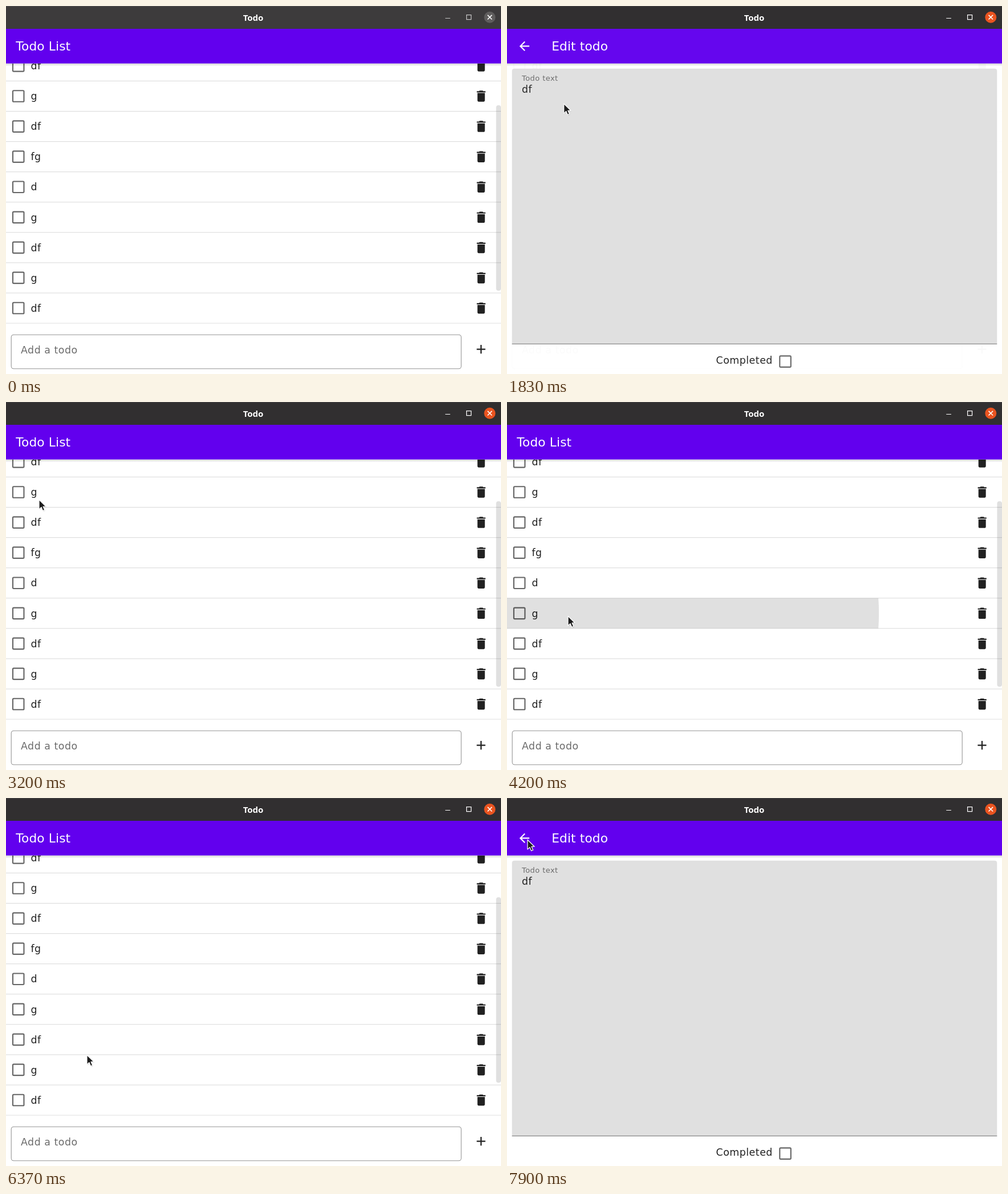
Write an HTML page that moves like this. It is 868x645 px and loops after 8 s.

```html
<!DOCTYPE html>
<html lang="en">
<head>
<meta charset="utf-8">
<title>Todo</title>
<style>
  html, body { margin: 0; width: 100%; height: 100%; overflow: hidden; background: #fff; }
  svg { display: block; width: 100vw; height: 100vh; }
  text { font-family: "DejaVu Sans", sans-serif; fill: #212121; white-space: pre; }
  .title { font: bold 15px "Open Sans", sans-serif; fill: #fff; text-anchor: middle; }
  .heading { font-size: 21.67px; letter-spacing: .16px; fill: #fff; }
  .body { font-size: 17.33px; letter-spacing: .54px; }
  .label { font-size: 13px; letter-spacing: .43px; }
  .muted { fill: #6b6b6b; }
  .box { fill: none; stroke: #666; stroke-width: 2.17; }
  .icon { fill: #212121; }
</style>
</head>
<body>
<svg viewBox="0 0 868 645" preserveAspectRatio="none">
  <defs>
    <linearGradient id="shade" x2="0" y2="1">
      <stop stop-opacity=".16"/>
      <stop offset="1" stop-opacity="0"/>
    </linearGradient>
    <clipPath id="listClip"><rect y="100.7" width="868" height="456"/></clipPath>
    <clipPath id="rowClip"><rect id="rowRect" width="868" height="53"/></clipPath>
    <rect id="check" class="box" x="-9.75" y="-9.75" width="19.5" height="19.5" rx="1.6"/>
    <path id="trash" transform="scale(1.0833) translate(-12 -12)"
      d="M6 19c0 1.1.9 2 2 2h8c1.1 0 2-.9 2-2V7H6zM19 4h-3.5l-1-1h-5l-1 1H5v2h14z"/>
    <g id="bar">
      <rect y="100.7" width="868" height="5" fill="url(#shade)"/>
      <rect y="40" width="868" height="60.7" fill="#6200ee"/>
    </g>
  </defs>
  <rect width="868" height="645" fill="#fff"/>

  <g id="listScreen">
    <g clip-path="url(#listClip)">
      <g id="rows"></g>
      <g clip-path="url(#rowClip)"><circle id="rowRipple"/></g>
    </g>
    <rect x="859.4" y="174" width="8.6" height="325" rx="4" fill="#000" fill-opacity=".12"/>
    <use href="#bar"/>
    <text class="heading" x="17.3" y="78">Todo List</text>
    <rect x="9.2" y="576.2" width="789" height="59.6" rx="4.3" fill="none" stroke="#959595" stroke-width="1.1"/>
    <text class="body muted" x="26" y="609">Add a todo</text>
    <path class="icon" transform="translate(833 601.7) scale(1.0833) translate(-12 -12)"
      d="M19 13h-6v6h-2v-6H5v-2h6V5h2v6h6z"/>
  </g>

  <g id="editScreen">
    <use href="#bar"/>
    <path transform="translate(30.5 70.4) scale(1.0833) translate(-12 -12)" fill="#fff"
      d="M20 11H7.83l5.59-5.59L12 4l-8 8 8 8 1.41-1.41L7.83 13H20z"/>
    <circle id="backRipple" cx="30.5" cy="70.4" fill="#fff"/>
    <text class="heading" x="78.2" y="78">Edit todo</text>
    <path fill="#e0e0e0" d="M8.7 592.5V114q0-4.3 4.3-4.3H855q4.3 0 4.3 4.3V592.5z"/>
    <rect x="8.7" y="591.8" width="850.6" height="1.1" fill="#7d7d7d"/>
    <text class="label muted" x="26" y="131">Todo text</text>
    <text class="body" id="editText" x="26" y="152"></text>
    <text class="body" x="366.5" y="626.5">Completed</text>
    <use href="#check" x="488" y="623.2"/>
  </g>

  <rect id="titleBar" width="868" height="40"/>
  <rect width="868" height="1" fill="#fff" fill-opacity=".09"/>
  <text class="title" x="433.5" y="25.7">Todo</text>
  <g id="controls" fill="none" stroke="#fff" stroke-width="1.2">
    <path d="M770.3 21.5h8.6M807.6 15.6h8v8h-8z"/>
  </g>
  <circle id="close" cx="848.3" cy="19.7" r="10"/>
  <path d="M844.5 15.9l7.6 7.6m0-7.6l-7.6 7.6" stroke="#fff" stroke-width="1.5"/>

  <g id="cursor">
    <path d="M2 2.5V19L6 15.6L8.7 22L11.8 20.7L9.2 14.5H14.4z" fill="#000" fill-opacity=".15"/>
    <path d="M1 1.3V18L5 14.4L7.6 20.6L10.7 19.3L8.1 13.2H13.2z"
      fill="#1c1c1c" stroke="#fff" stroke-width="1.2" stroke-linejoin="round"/>
  </g>
</svg>
<script>
const LOOP = 8000, FADE = 300, FOCUS_AT = 1500;
const ROW_STEP = 53.08, FIRST_CENTER = 104.9;
const items = ['df', 'g', 'df', 'fg', 'd', 'g', 'df', 'g', 'df'];

// Each visit: row pressed, edit screen opened, back pressed, list restored.
const visits = [
  { press: 1448, x: 122, row: 2, open: 1590, back: 2780, close: 2890 },
  { press: 4097, x: 106, row: 5, open: 4237, back: 5280, close: 5390 },
  { press: 6990, x: 115, row: 8, open: 7190, back: Infinity, close: Infinity },
];

// time, x, y of the pointer tip
const path = [
  [30, 72, 30], [530, 122, 203], [670, 122, 203], [830, 122, 207],
  [1620, 122, 207], [2300, 47, 88], [2570, 23, 73],
  [2930, 23, 73], [3600, 107, 313], [3870, 106, 374],
  [4270, 106, 374], [4930, 34, 94], [5070, 34, 79],
  [5430, 34, 79], [6100, 149, 222], [6200, 143, 438], [6370, 141, 449],
  [6860, 115, 525], [7230, 115, 525], [7570, 67, 148],
  [7770, 67, 148], [7900, 35, 72],
];

const $ = id => document.getElementById(id);
const clamp = v => Math.max(0, Math.min(1, v));
const lerp = (a, b, p) => a + (b - a) * p;
const set = (id, attrs) => {
  for (const name in attrs) $(id).setAttribute(name, attrs[name]);
};

// cubic-bezier(.4, 0, .2, 1)
function ease(x) {
  if (x <= 0 || x >= 1) return clamp(x);
  let low = 0, high = 1, s = .5;
  for (let i = 0; i < 20; i++) {
    s = (low + high) / 2;
    const bx = 3 * (1 - s) ** 2 * s * .4 + 3 * (1 - s) * s * s * .2 + s ** 3;
    if (bx < x) low = s; else high = s;
  }
  return 3 * (1 - s) * s * s + s ** 3;
}

const rippleAlpha = (age, hold) =>
  age < 0 ? 0 : clamp(age / 75) * (1 - clamp((age - Math.max(225, hold)) / 150));

$('rows').innerHTML = items.map((label, i) => {
  const y = FIRST_CENTER + i * ROW_STEP;
  return `<use href="#check" x="21.7" y="${y}"/>
    <text class="body" x="43.4" y="${y + 6.2}">${label}</text>
    <g class="icon" transform="translate(833.2 ${y})"><use href="#trash"/></g>
    <rect y="${y + 26}" width="868" height="1.08" fill-opacity=".14"/>`;
}).join('');

function pointerAt(t) {
  const next = path.findIndex(point => point[0] > t);
  if (next < 0) return path[path.length - 1].slice(1);
  if (next === 0) return path[0].slice(1);
  const [t0, x0, y0] = path[next - 1], [t1, x1, y1] = path[next];
  const p = (t - t0) / (t1 - t0);
  return [lerp(x0, x1, p), lerp(y0, y1, p)];
}

function drawRipples(t, visit) {
  const age = t - visit.press, p = clamp(age / 225);
  const shown = t >= FOCUS_AT ? .12 * rippleAlpha(age, visit.open - visit.press) : 0;
  const center = FIRST_CENTER + visit.row * ROW_STEP;
  set('rowRect', { y: center - 26.5 });
  set('rowRipple', {
    cx: lerp(visit.x, 434, p), cy: center,
    r: lerp(260, 446, ease(p)), 'fill-opacity': shown,
  });
  const backAge = t - visit.back;
  set('backRipple', {
    r: lerp(15.6, 26, ease(clamp(backAge / 225))),
    'fill-opacity': .24 * rippleAlpha(backAge, visit.close - visit.back),
  });
}

function draw(t) {
  const visit = visits.filter(v => t >= v.press).pop() || visits[0];
  const shown = ease((t - visit.open) / FADE) - ease((t - visit.close) / FADE);
  set('listScreen', { opacity: 1 - shown });
  set('editScreen', { opacity: shown });
  $('editText').textContent = items[visit.row];
  drawRipples(t, visit);

  const focused = t >= FOCUS_AT;
  set('titleBar', { fill: focused ? '#312f30' : '#3d3b3c' });
  set('controls', { 'stroke-opacity': focused ? 1 : .7 });
  set('close', { fill: focused ? '#e95420' : '#5f5d5d' });

  const [x, y] = pointerAt(t);
  set('cursor', { transform: `translate(${x} ${y})`, opacity: t < 30 ? 0 : 1 });
}

const start = performance.now();
function tick() {
  draw((performance.now() - start) % LOOP);
  requestAnimationFrame(tick);
}
tick();
</script>
</body>
</html>
```
